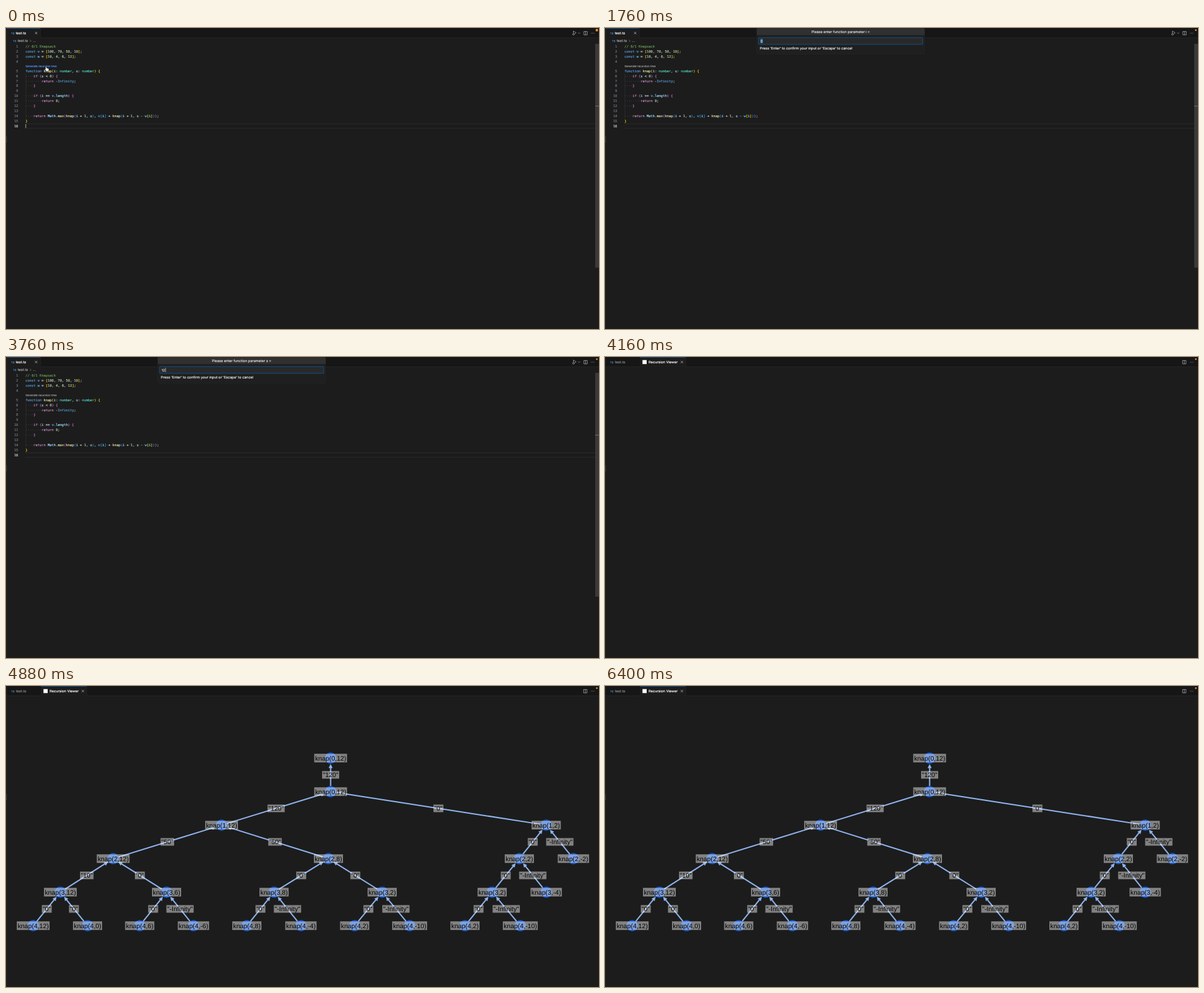
An HTML page for the animation above (6.48 s loop, 938 by 476 pixels).

```html
<!DOCTYPE html>
<html lang="en">
<head>
<meta charset="utf-8">
<title>Recursion tree</title>
<style>
html, body { margin: 0; width: 100%; height: 100%; overflow: hidden; background: #1c1c1c; }
svg { display: block; width: 938px; height: 476px; }
text {
  font: 5.55px Inter, sans-serif; text-rendering: geometricPrecision; white-space: pre;
  fill: currentColor; stroke: currentColor; stroke-width: .16px;
}
tspan { fill: currentColor; stroke: currentColor; }
.code { font: 5.31px "DejaVu Sans Mono", monospace; }
.badge { font-size: 4px; font-weight: 600; }
.lens { font-size: 4.4px; }
.node { font: 10.3px "Liberation Sans", Arial, sans-serif; color: #000; text-anchor: middle; stroke: none; }
</style>
</head>
<body>
<svg id="stage" viewBox="0 0 938 476"></svg>
<script>
const LOOP = 6480, BG = '#1c1c1c', BAR = '#161616', LINE = '#2b2b2b', BLUE = '#0a5ca3';
const $ = id => document.getElementById(id);
const rect = (x, y, w, h, fill, more = '') =>
  `<rect x="${x}" y="${y}" width="${w}" height="${h}" fill="${fill}" ${more}/>`;
const text = (x, y, s, color = '#ddd', more = '') =>
  `<text x="${x}" y="${y}" style="color:${color}" ${more}>${s}</text>`;
const path = (d, stroke = '#b0b0b0', w = .7, fill = 'none') =>
  `<path d="${d}" stroke="${stroke}" stroke-width="${w}" fill="${fill}"/>`;
const group = (id, body) => `<g id="${id}">${body}</g>`;
const show = (id, on) => $(id).setAttribute('visibility', on ? 'visible' : 'hidden');

// Code listing
const source = `// 0/1 Knapsack
const v = [100, 70, 50, 10];
const w = [10, 4, 6, 12];

function knap(i: number, s: number) {
    if (s < 0) {
        return -Infinity;
    }

    if (i == v.length) {
        return 0;
    }

    return Math.max(knap(i + 1, s), v[i] + knap(i + 1, s - w[i]));
}
`.split('\n');
const colors = [
  [/^(const|function|Infinity)$/, '#569cd6'], [/^(if|return)$/, '#c586c0'],
  [/^number$/, '#4ec9b0'], [/^(knap|max)$/, '#dcdcaa'], [/^[vw]$/, '#4fc1ff'],
  [/^\d+$/, '#b5cea8'], [/^\w+$/, '#9cdcfe'], [/^ +$/, '#484848']
];
const pairs = ['#ffd700', '#da70d6', '#179fff'];
let depth = 0;

function tint(token, comment) {
  if (comment && token.trim()) return '#6a9955';
  if (/[([{]/.test(token)) return pairs[depth++ % 3];
  if (/[)\]}]/.test(token)) return pairs[--depth % 3];
  return (colors.find(c => c[0].test(token)) || [0, '#d4d4d4'])[1];
}

function codeLine(line, n) {
  const y = (n < 4 ? 29 + n * 8 : 67.6 + (n - 4) * 7.95) + 2;
  const spans = (line.match(/\w+| +|[^\w ]/g) || []).map(token =>
    `<tspan style="color:${tint(token, line.startsWith('//'))}">${
      token.replace(/ /g, '·').replace('<', '&lt;')}</tspan>`).join('');
  return text(19.3, y, n + 1, n == 15 ? '#ccc' : '#6e7681', 'class="code" text-anchor="end"') +
    `<text class="code" x="30.8" y="${y}">${spans}</text>`;
}

// Window parts
const cross = x => path(`M${x - 1.8} 6.2l3.6 3.6m0-3.6l-3.6 3.6`, '#ccc');
const dots = (x, y) => [0, 2, 4].map(d => rect(x + d, y, .9, .9, '#999')).join('');
const splitIcon = x => path(`M${x} 5.5h5.4v5.4h-5.4zM${x + 2.7} 5.5v5.4`);
const badge = (x, y) => text(x, y, 'TS', '#3b82c4', 'class="badge"');
const frame = rect(0, 0, 938, 476, BG) + rect(0, 0, 938, 15, BAR) + rect(0, 15, 938, .6, LINE);
const edge = rect(.7, 0, .7, 476, LINE) + rect(0, 171, 1.2, 10, '#3a3a3a');
const tab = (x, w) => rect(x, 0, w, 15.8, BG) + rect(x, 0, w, .8, BLUE) + rect(x + w, 0, .6, 15, LINE);

const editor = frame + tab(1, 53.5) + edge +
  badge(8, 9.5) + text(15.6, 10, 'test.ts', '#fff') + cross(47.7) +
  path('M897.5 4.8l4.4 2.8-3 2M897.5 4.8v4') +
  '<circle cx="897.6" cy="10" r="1.3" fill="none" stroke="#b0b0b0" stroke-width=".7"/>' +
  path('M905.2 7.4l1.4 1.4 1.4-1.4') + splitIcon(914) + dots(925.6, 7.7) +
  badge(11, 22.2) + text(18.6, 22.4, 'test.ts', '#aaa') +
  path('M38 18.6l1.6 1.7-1.6 1.7', '#999', .6) + text(42.5, 22.4, '...', '#aaa') +
  rect(30, 151, 902, 1, '#292929') + rect(30, 158, 902, 1, '#292929') +
  rect(31, 72, .5, 71, '#383838') +
  source.map(codeLine).join('') +
  text(30.8, 61.9, 'Generate recursion tree', '#999', 'id="lens" class="lens"') +
  rect(932, 25, 6, 354, '#3a3a3a') + rect(932, 123, 6, 1, '#707070') +
  rect(30.8, 152, .7, 6.2, '#ddd', 'id="caret"');

const popup = rect(239, 0, 267.5, 43, '#141414', 'rx="2" opacity=".3"') +
  rect(240, 0, 265.5, 41.6, '#1f1f1f', 'rx="2" stroke="#292929" stroke-width=".6"') +
  rect(240, .5, 265.5, 10.8, '#303030', 'rx="2"') +
  text(372.7, 8, '', '#ddd', 'id="title" text-anchor="middle"') +
  rect(242.9, 15.1, 259.8, 10.8, '#292929', `rx=".8" stroke="${BLUE}" stroke-width=".8"`) +
  rect(245.8, 17, 3.8, 7.2, '#2f669c', 'id="selection"') +
  text(246, 22.5, '', '#ddd', 'id="input"') +
  rect(252.3, 17, .6, 7, '#ddd', 'id="inputCaret"') +
  text(245, 34, "Press 'Enter' to confirm your input or 'Escape' to cancel", '#eee');

const viewer = frame + tab(55, 72.5) + edge +
  badge(8, 9.5) + text(15.8, 9.8, 'test.ts', '#8c8c8c') +
  rect(59.3, 4.8, 6.6, 6.4, '#fff') + text(69, 9.8, 'Recursion Viewer', '#fff') + cross(121.6) +
  splitIcon(913.6) + dots(925.6, 7.7);

// Recursion tree: x positions in call order, everything else follows from the calls
const values = [100, 70, 50, 10], weights = [10, 4, 6, 12];
const xs = [513.5, 341, 169.5, 86, 43, 129, 254, 211.5, 296.5, 510, 424, 381, 466.5,
  595, 551.5, 638.5, 854.5, 812, 769, 726, 813.5, 854.5, 897.5];
const measure = document.createElement('canvas').getContext('2d');
measure.font = '10.3px "Liberation Sans", Arial, sans-serif';
let lines = '', discs = '', labels = '';

function label(x, y, s, h) {
  const w = measure.measureText(s).width + 2.6;
  labels += rect(x - w / 2, y - h / 2, w, h, '#fff', 'fill-opacity=".45"') +
    `<text class="node" x="${x}" y="${y + 3.6}">${s}</text>`;
}

function node(x, y, i, s) {
  discs += `<circle cx="${x}" cy="${y}" r="9" fill="#1554c0"/>`;
  label(x, y, `knap(${i},${s})`, 13.6);
}

function link(x, y, px, py, value) {
  const a = Math.atan2(py - y, px - x) * 180 / Math.PI, d = Math.hypot(px - x, py - y);
  lines += `<g transform="translate(${x} ${y}) rotate(${a})">` +
    path(`M9 0H${d - 13}`, '#8fb4ee', 2) +
    path(`M${d - 9.3} 0l-6.5-3.2v6.4z`, 'none', 0, '#8fb4ee') + '</g>';
  label((x + px) / 2, (y + py) / 2, `"${value}"`, 12);
}

function knap(i, s, px, py) {
  const x = xs.shift(), y = py + 53;
  node(x, y, i, s);
  let value = s < 0 ? -Infinity : 0;
  if (s >= 0 && i < 4) {
    const skip = knap(i + 1, s, x, y);
    value = Math.max(skip, values[i] + knap(i + 1, s - weights[i], x, y));
  }
  link(x, y, px, py, value);
  return value;
}
node(513.5, 114, 0, 12);
knap(0, 12, 513.5, 114);

const hand = path('M-1.6-3.4q.9-.9 1.5.3l.8 1.6 2.2.5q1.4.6.9 2.2l-.7 2.2h-3.2l-2.3-2.5q-.4-1 .9-.8z',
  '#111', .5, '#fff');
const beam = path('M-1.7-3.6q1.7 0 1.7 1v5.2q0 1-1.7 1M1.7-3.6q-1.7 0-1.7 1v5.2q0 1 1.7 1M-1 .9h2', '#eee', .9);

$('stage').innerHTML = group('editor', editor) + group('popup', popup) + group('viewer', viewer) +
  group('tree', lines + discs + labels) +
  group('mouse', group('hand', hand) + group('beam', beam)) +
  rect(0, 0, 0, 0, '#e8912d', 'id="dot"');

function draw(now) {
  const t = now % LOOP;
  const open = t >= 160 && t < 3840, second = t >= 2000, typed = t >= 3040;
  const view = t >= 4000, early = t < 960;

  show('editor', !view);
  show('caret', t < 160);
  $('lens').style.color = t < 560 ? '#4d8df0' : '#999';

  show('popup', open);
  show('selection', open && !typed);
  show('inputCaret', open && t >= 3280);
  $('title').textContent = `Please enter function parameter ${second ? 's' : 'i'} =`;
  $('input').textContent = !typed ? '0' : t < 3280 ? '1' : '12';

  show('viewer', view);
  show('tree', t >= 4400);

  const p = Math.min(4, Math.max(0, Math.floor((t - 480) / 80))) / 4;
  $('mouse').setAttribute('transform', `translate(${64 + 31 * p} ${65 - 7 * p})`);
  show('hand', early && !p);
  show('beam', early && p > 0);

  const size = early ? 3.6 : 2.6;
  for (const [k, v] of Object.entries({
    x: 934.6 - size / 2, y: 3.4 - size / 2, width: size, height: size, rx: early ? .6 : 1.3
  })) $('dot').setAttribute(k, v);
  requestAnimationFrame(() => draw(performance.now() - start));
}
const start = performance.now();
draw(0);
</script>
</body>
</html>
```
